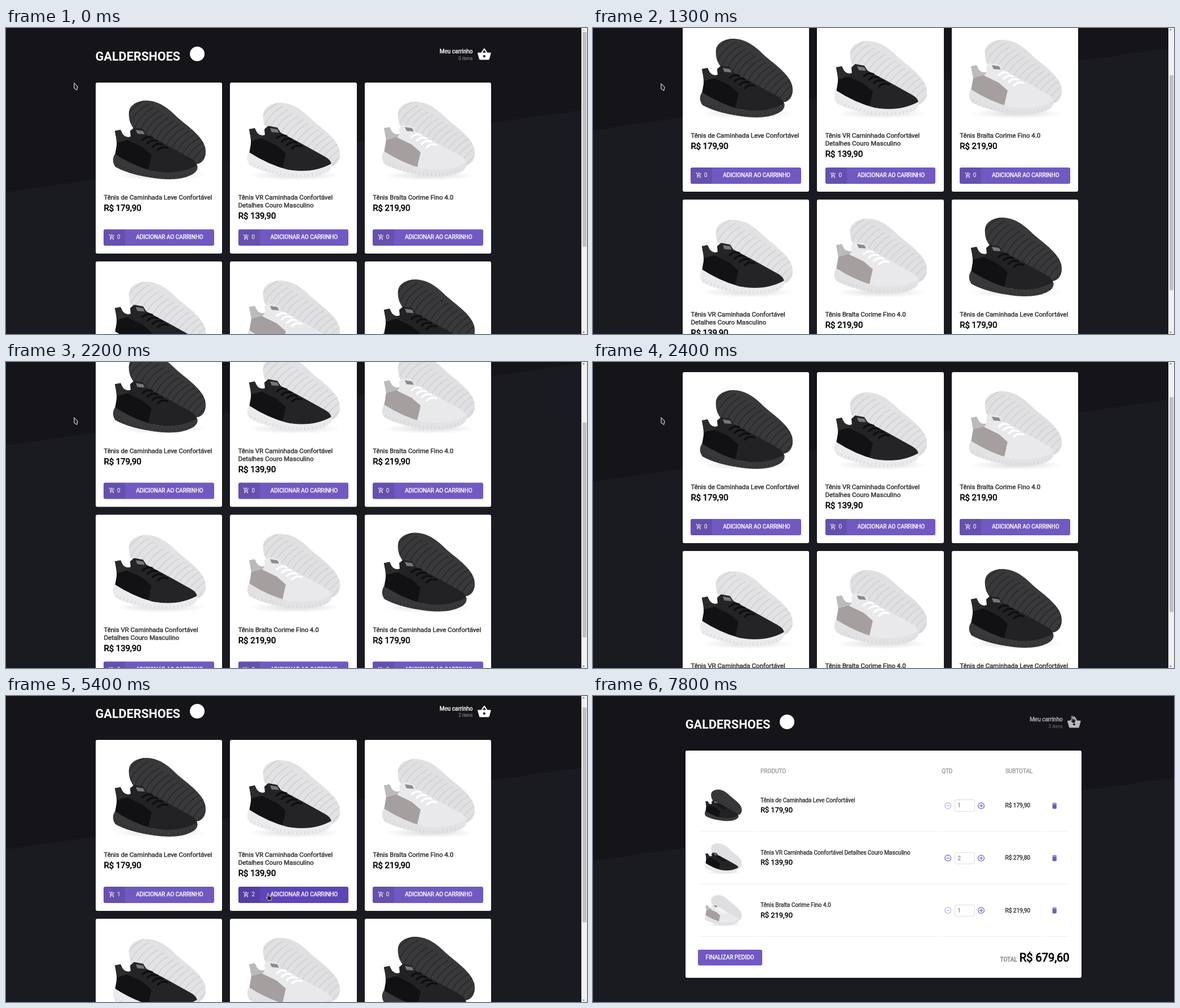
These frames come from a looping animation (1030x544 px, 8000 ms). An HTML page:

```html
<!DOCTYPE html>
<html lang="pt-BR">
<head>
<meta charset="utf-8">
<title>Loja de tênis</title>
<style>
@property --s { syntax: '<number>'; inherits: true; initial-value: 0; }
@property --hand { syntax: '<number>'; inherits: true; initial-value: 0; }

* { box-sizing: border-box; margin: 0; padding: 0; }
html, body { width: 100%; height: 100%; overflow: hidden; background: #141419; }
body { position: relative; font: 10.01px/11.73px Roboto, Arial, sans-serif; color: #333; }
svg { display: block; flex: none; fill: currentColor; }
.abs, .page, .bg, header > *, #bar, #bar *, #cursor, #cursor svg { position: absolute; }
.bold { font-weight: 400; -webkit-text-stroke: .04em; }
.ico { width: 14.3px; height: 14.3px; }

#stage { position: absolute; inset: 0; overflow: hidden; animation: scroll 8s linear infinite; }
.page { left: 0; top: 0; width: 1030px; height: 753px; background: #141419; }
.bg { inset: 0; background: #1a1b20; }
#shop { transform: translateY(calc(var(--s) * -1px)); }
#shop .bg { clip-path: polygon(0 291.5px, 1020px 146px, 1020px 100%, 0 100%); }
#cart { animation: page 8s step-end infinite; }
#cart .bg { clip-path: polygon(0 293px, 1030px 145px, 1030px 100%, 0 100%); }

header { position: absolute; left: 159.1px; top: 0; width: 701.4px; color: #fff; }
#cart header { left: 164.4px; }
.brand { left: -.6px; top: 37.6px; font: 700 21.7px/26px Roboto, Arial, sans-serif; }
.mark { left: 166.5px; top: 33px; width: 26px; height: 26px; border-radius: 50%; background: #fff; }
.basket { inset: 0 0 auto 0; height: 70px; }
#shop .basket { animation: fade 8s linear infinite; }
#cart .basket { opacity: .7; }
.basket > * { position: absolute; right: 33px; }
.basket svg { right: 0; top: 34.3px; width: 25.75px; height: 25.75px; }
.basket .bold { top: 36px; line-height: 12px; }
.basket .items { top: 48.5px; font-size: 8.58px; color: #999; text-align: right; }

.reel { height: 1.2em; line-height: 1.2em; overflow: hidden; }
.reel i { display: block; font-style: normal; white-space: nowrap; animation: 8s step-end infinite; }

#grid { position: absolute; left: 159.1px; top: 97px; display: grid; grid-template-columns: repeat(3, 224.1px); gap: 14.3px; }
.card { position: relative; height: 303.8px; padding: 14.3px; border-radius: 2.9px; background: #fff; }
.card .shoe { width: 178.8px; height: 178.8px; margin: 0 auto; }
.card h2 { margin-top: 3.6px; font-size: 11.44px; line-height: 14.3px; }
.card p { margin-top: 3.6px; font-size: 15.02px; line-height: 17.6px; color: #000; }
.add { position: absolute; left: 14.3px; right: 14.3px; bottom: 14.3px; height: 28.6px; display: flex; overflow: hidden;
  border-radius: 2.9px; background: #7159c1; color: #fff; line-height: 28.6px; text-align: center; animation: 8s linear infinite; }
.count { display: flex; align-items: center; gap: 3.6px; padding: 0 8.6px; background: rgba(0, 0, 0, .1); }
.count svg { width: 11.44px; height: 11.44px; }
.add > .bold { flex: 1; }

#panel { left: 164.4px; top: 96.6px; width: 701.4px; height: 404.4px; border-radius: 2.9px; background: #fff; }
.grey { color: #999; }
.row { position: absolute; left: 186.9px; height: 91.8px; display: grid; column-gap: 1.43px;
  grid-template-columns: 100px 319.8px 111.3px 74.1px 46.4px; }
.row > div { display: flex; align-items: center; padding-left: 8.6px; border-bottom: 1px solid #eee; white-space: nowrap; }
.row .shoe { width: 71.5px; height: 71.5px; }
.row .name { flex-direction: column; align-items: flex-start; justify-content: center; }
.row .name p { margin-top: 3.6px; font-size: 12.88px; line-height: 15.1px; color: #000; }
.row .ico { margin: 0 4.3px; color: #7159c1; }
.row .off { opacity: .5; }
.qty { width: 35.8px; height: 21.5px; padding-left: 4.3px; border: 1px solid #ddd; border-radius: 2.9px; line-height: 20px; color: #666; }
#order { left: 185.5px; top: 450.8px; width: 114.5px; height: 28.6px; border-radius: 2.9px; background: #7159c1;
  color: #fff; line-height: 28.6px; text-align: center; }
#total { right: 185.4px; top: 453px; font-size: 20.03px; line-height: 24px; color: #000; white-space: nowrap; }

#bar { left: 1019.5px; top: 0; width: 10.5px; height: 544px; background: #f1f1f1; }
#bar div { left: 2px; top: 7px; width: 7.2px; height: 382px; background: #c1c1c1; transform: translateY(calc(var(--s) * .7017px)); }
#bar i { left: 2.8px; border: 2.6px solid transparent; }
#up { top: -.5px; border-bottom-color: #505050 !important; opacity: calc(.4 + var(--s)); }
#down { top: 539.5px; border-top-color: #505050 !important; opacity: calc(208.4 - var(--s)); }

#cursor { left: 0; top: 0; animation: cursor 8s linear infinite, hand 8s step-end infinite; }
#cursor svg { overflow: visible; fill: #222; stroke: #fff; stroke-linejoin: round; }
#arrow { opacity: calc(1 - var(--hand)); }
#hand { left: -4px; opacity: var(--hand); }

.black { --sole: #39393b; --tread: #28282a; --upper: #222224; --heel: #111113; --mid: #38383a; --lace: #0e0e10; --in: #2b2b2d; --tag: #77777a; --front-y: 3px; --back-y: 0px; }
.mixed { --sole: #e2e2e4; --tread: #d0d0d4; --upper: #242426; --heel: #121214; --mid: #ebebed; --lace: #0e0e10; --in: #2b2b2d; --tag: #77777a; --front-y: 0px; --back-y: 4px; }
.white { --sole: #e0e0e2; --tread: #d0d0d3; --upper: #e9e9ec; --heel: #a59f9f; --mid: #e2e2e5; --lace: #fff; --in: #bdbabc; --tag: #8d8a8c; --front-y: -2px; --back-y: 2px; }
.front { transform: translateY(var(--front-y)); }
.back { transform: translateY(var(--back-y)); }

@keyframes scroll {
  0%, 10% { --s: 0; animation-timing-function: steps(5); }
  16.25% { --s: 110; animation-timing-function: steps(4); }
  21.25%, 25% { --s: 208; animation-timing-function: steps(4); }
  30%, 36.25% { --s: 79; animation-timing-function: steps(2); }
  38.75%, 100% { --s: 19; }
}
@keyframes cursor {
  0% { transform: translate(120px, 97px); animation-timing-function: step-end; }
  1.25%, 36.25% { transform: translate(120px, 98px); animation-timing-function: step-end; }
  37.5% { transform: translate(200px, 230px); animation-timing-function: step-end; }
  38.75%, 45% { transform: translate(286px, 352px); animation-timing-function: steps(4); }
  50% { transform: translate(310px, 358px); animation-timing-function: steps(4); }
  55% { transform: translate(396px, 364.5px); animation-timing-function: steps(2); }
  57.5% { transform: translate(444px, 365px); animation-timing-function: step-end; }
  58.75%, 68.75% { transform: translate(464.5px, 350px); animation-timing-function: steps(3); }
  72.5% { transform: translate(618px, 368px); animation-timing-function: steps(2); }
  75%, 82.5% { transform: translate(690px, 354px); animation-timing-function: steps(2); }
  85% { transform: translate(830px, 345px); animation-timing-function: steps(2); }
  87.5% { transform: translate(933px, 250px); animation-timing-function: steps(3); }
  91.25% { transform: translate(900px, 90px); animation-timing-function: steps(2); }
  93.75%, 100% { transform: translate(849.5px, 35px); }
}
@keyframes hand {
  0%, 53.75%, 72.5%, 86.25% { --hand: 0; }
  38.75%, 56.25%, 73.75%, 93.75%, 100% { --hand: 1; }
}
@keyframes hover0 {
  0%, 37.5% { background: #7159c1; animation-timing-function: step-end; }
  38.75%, 52.5% { background: #5e44b7; animation-timing-function: steps(2); }
  55%, 100% { background: #7159c1; }
}
@keyframes hover1 {
  0%, 55% { background: #7159c1; animation-timing-function: steps(2); }
  57.5%, 71.25% { background: #5e44b7; animation-timing-function: steps(2); }
  73.75%, 100% { background: #7159c1; }
}
@keyframes hover2 {
  0%, 72.5% { background: #7159c1; animation-timing-function: steps(2); }
  75%, 85% { background: #5e44b7; animation-timing-function: steps(2); }
  87.5%, 100% { background: #7159c1; }
}
@keyframes fade {
  0%, 92.5% { opacity: 1; animation-timing-function: steps(2); }
  95%, 100% { opacity: .7; }
}
@keyframes page { 0% { opacity: 0; } 95%, 100% { opacity: 1; } }
@keyframes reel0 { 0% { translate: 0 0; } 43.75%, 100% { translate: 0 -1.2em; } }
@keyframes reel1 { 0% { translate: 0 0; } 62.5% { translate: 0 -1.2em; } 67.5%, 100% { translate: 0 -2.4em; } }
@keyframes reel2 { 0% { translate: 0 0; } 78.75%, 100% { translate: 0 -1.2em; } }
@keyframes items {
  0% { translate: 0 0; } 43.75% { translate: 0 -1.2em; }
  62.5% { translate: 0 -2.4em; } 78.75%, 100% { translate: 0 -3.6em; }
}
</style>
</head>
<body>
<svg width="0" height="0" style="position:absolute">
  <clipPath id="soleClip"><path id="solePath" d="M36 39C37 25 52 18 68 18C90 19 106 32 121 47C140 64 172 84 172 108C172 125 163 132 150 131L100 115L46 70C38 60 35 50 36 39Z"/></clipPath>
  <radialGradient id="shade"><stop stop-color="#999" stop-opacity=".35"/><stop offset="1" stop-color="#999" stop-opacity="0"/></radialGradient>
  <symbol id="shoe" viewBox="0 0 178.8 178.8">
    <ellipse cx="92" cy="151" rx="82" ry="9" fill="url(#shade)"/>
    <g class="back">
      <use href="#solePath" fill="var(--sole)"/>
      <g id="tread" clip-path="url(#soleClip)" fill="none" stroke="var(--tread)" stroke-width="1.6"></g>
    </g>
    <g class="front">
      <path fill="var(--upper)" d="M11 69L21 67L25 75Q31 82 39 79L38 69L45 63L61 66L67 75Q92 88 112 99L146 118Q157 124 157 133L120 147L60 138L12 112Q17 95 11 69Z"/>
      <path fill="var(--in)" d="M11 69L21 67L25 75Q31 82 39 79L33 88L15 90Z"/>
      <path fill="var(--heel)" d="M15 90L33 85L60 98L76 112L70 139L50 133L11 113Z"/>
      <path fill="var(--tag)" d="M48 67L61 69L64 75L51 74Z"/>
      <g id="laces" fill="none" stroke="var(--lace)" stroke-width="3.5" stroke-linecap="round"></g>
      <path fill="var(--mid)" d="M11 110Q45 132 80 141Q125 148 157 130Q160 140 147 147Q122 160 75 152Q35 146 12 133Q4 122 11 110Z"/>
      <path fill="none" stroke="var(--tread)" stroke-width="5" stroke-dasharray="1 6" d="M14 130Q40 143 78 150Q122 155 150 142"/>
    </g>
  </symbol>
</svg>
<div id="stage">
  <div id="shop" class="page"><div class="bg"></div></div>
  <div id="bar"><div></div><i id="up"></i><i id="down"></i></div>
  <div id="cart" class="page"><div class="bg"></div></div>
  <div id="cursor">
    <svg id="arrow" width="9" height="15"><path d="M.8 .8L7 7L5.6 13.4L.8 10.2Z"/></svg>
    <svg id="hand" width="11" height="14"><path stroke-width=".8" d="M3 1.2Q4 0 5 1.2V5.5L9 6.3Q10.5 6.8 10.3 8.5L9.5 13.3H4.5L.8 9Q.5 7.7 2 8L3 8.8Z"/></svg>
  </div>
</div>
<script>
const $ = id => document.getElementById(id);
const add = (id, html) => $(id).insertAdjacentHTML('beforeend', html);
const times = (n, f) => Array.from({ length: n }, (_, i) => f(i)).join('');

const paths = {
  basket: 'M17.21 9l-4.38-6.56c-.19-.28-.51-.42-.83-.42-.32 0-.64.14-.83.43L6.79 9H2c-.55 0-1 .45-1 1 0 .09.01.18.04.27l2.54 9.27c.23.84 1 1.46 1.92 1.46h13c.92 0 1.69-.62 1.93-1.46l2.54-9.27L23 10c0-.55-.45-1-1-1h-4.79zM9 9l3-4.4L15 9H9zm3 8c-1.1 0-2-.9-2-2s.9-2 2-2 2 .9 2 2-.9 2-2 2z',
  cart: 'M11 9h2V6h3V4h-3V1h-2v3H8v2h3zM5 20a2 2 0 1 0 4 0a2 2 0 1 0-4 0M15 20a2 2 0 1 0 4 0a2 2 0 1 0-4 0M7.17 14.75l.03-.12.9-1.63h7.45c.75 0 1.41-.41 1.75-1.03l3.86-7.01L19.42 4l-3.87 7H8.53L4.27 2H1v2h2l3.6 7.59-1.35 2.45C4.5 15.4 5.5 17 7 17h12v-2H7.42c-.13 0-.25-.11-.25-.25z',
  trash: 'M6 19c0 1.1.9 2 2 2h8c1.1 0 2-.9 2-2V7H6v12zM19 4h-3.5l-1-1h-5l-1 1H5v2h14V4z'
};
const icon = name => `<svg class="ico" viewBox="0 0 24 24"><path d="${paths[name]}"/></svg>`;
const ring = (d, cls = '') => `<svg class="ico ${cls}" viewBox="0 0 24 24" style="fill:none;stroke:currentColor;stroke-width:2"><circle cx="12" cy="12" r="9"/><path d="${d}"/></svg>`;
const shoe = look => `<svg class="shoe ${look}"><use href="#shoe"/></svg>`;
const reel = (name, lines) => `<div class="reel">${lines.map(l => `<i style="animation-name:${name}">${l}</i>`).join('')}</div>`;

const products = [
  { look: 'black', name: 'Tênis de Caminhada Leve Confortável', price: '179,90', qty: 1, sum: '179,90' },
  { look: 'mixed', name: 'Tênis VR Caminhada Confortável Detalhes Couro Masculino', price: '139,90', qty: 2, sum: '279,80' },
  { look: 'white', name: 'Tênis Bralta Corime Fino 4.0', price: '219,90', qty: 1, sum: '219,90' }
];

const header = items => `<header>
  <div class="brand">GALDERSHOES</div><div class="mark"></div>
  <div class="basket"><div class="bold">Meu&nbsp;carrinho</div><div class="items">${items}</div>${icon('basket')}</div>
</header>`;

const card = (p, i) => `<div class="card">
  ${shoe(p.look)}<h2 class="bold">${p.name}</h2><p class="bold">R$ ${p.price}</p>
  <div class="add" style="animation-name:hover${i}">
    <div class="count">${icon('cart')}${reel('reel' + i, [0, 1, 2])}</div>
    <span class="bold">ADICIONAR AO CARRINHO</span>
  </div>
</div>`;

const row = (p, i) => `<div class="row" style="top:${149.7 + 93.2 * i}px">
  <div>${shoe(p.look)}</div>
  <div class="name bold">${p.name}<p>R$ ${p.price}</p></div>
  <div>${ring('M7 12h10', p.qty > 1 ? '' : 'off')}<span class="qty">${p.qty}</span>${ring('M7 12h10M12 7v10')}</div>
  <div class="bold">R$ ${p.sum}</div>
  <div>${icon('trash')}</div>
</div>`;

const label = (text, x) => `<div class="abs bold grey" style="left:${x}px;top:128px">${text}</div>`;

add('tread', times(16, i => `<path d="M${26 + i * 9} ${66 + i * 6}q4-30 36-48"/>`));
add('laces', times(4, i => `<path d="M${60 + i * 9} ${85 + i * 6}q8-8 17-4"/>`));

add('shop', header(reel('items', ['0 itens', '1 item', '2 itens', '3 itens'])) +
  `<div id="grid">${[0, 1, 2, 1, 2, 0].map((k, i) => card(products[k], i)).join('')}</div>`);

add('cart', header('3 itens') + '<div id="panel" class="abs"></div>' +
  label('PRODUTO', 297) + label('QTD', 618.2) + label('SUBTOTAL', 730.9) +
  products.map(row).join('') +
  `<div id="order" class="abs bold">FINALIZAR PEDIDO</div>
   <div id="total" class="abs bold"><span class="grey" style="font-size:10.01px">TOTAL</span><span style="margin-left:4px">R$ 679,60</span></div>`);
</script>
</body>
</html>
```
